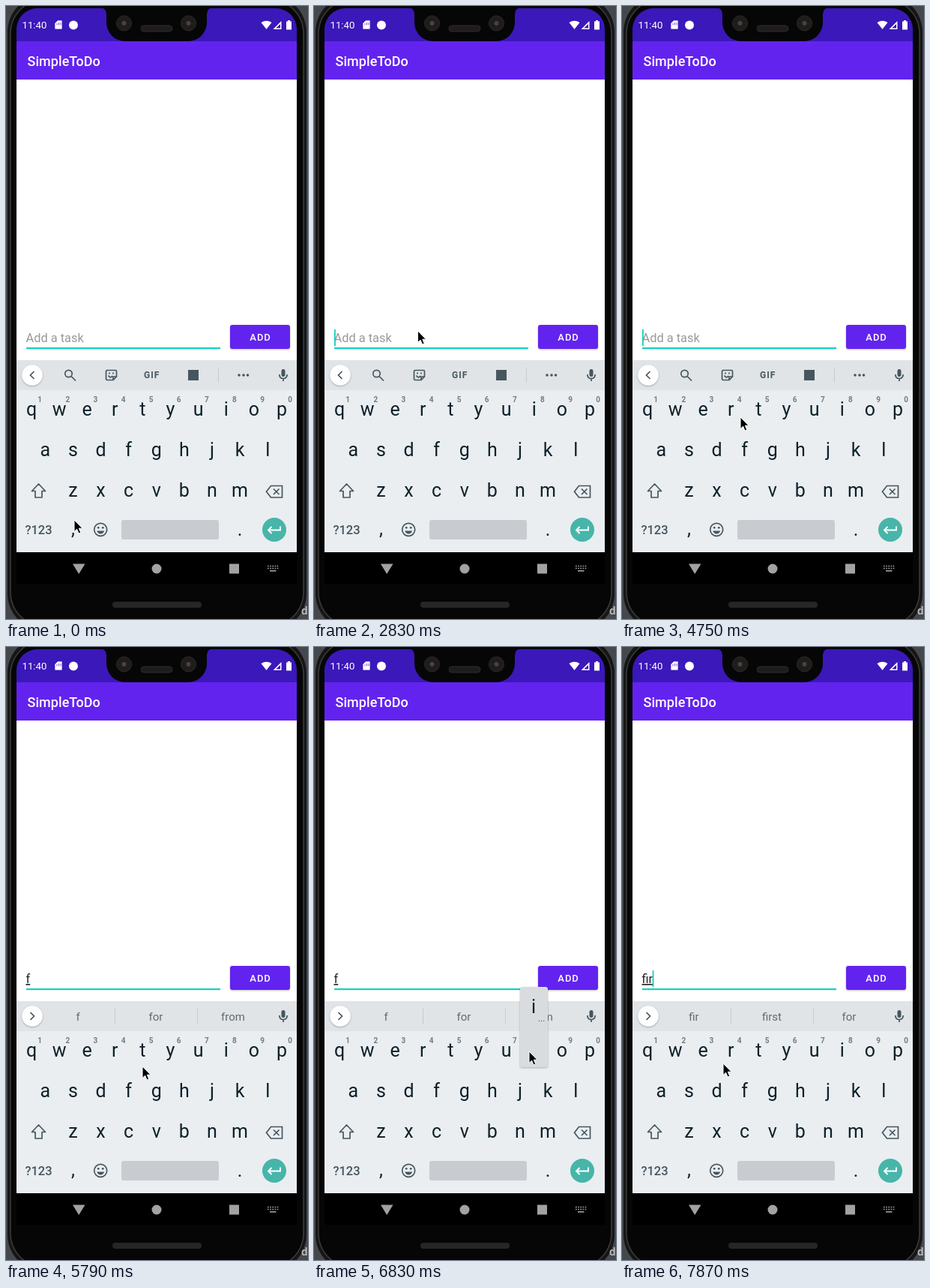
An HTML page for the animation above (8000 ms loop, 403 by 817 pixels).

```html
<!DOCTYPE html>
<html lang="en">
<head>
<meta charset="utf-8">
<title>Task list demo</title>
<style>
  html, body { margin: 0; width: 100%; height: 100%; overflow: hidden; background: #3b3e42; }
  svg { display: block; width: 403px; height: 817px; font-family: Roboto, sans-serif; }
  .mid { text-anchor: middle; }
  .key { font-size: 25px; fill: #0e2029; }
  .digit { font-size: 10px; font-weight: 700; fill: #757d82; }
  .hint { font-size: 15px; fill: #606b72; }
  .field { font-size: 16.4px; }
  .line { fill: none; stroke: #46565f; stroke-width: 1.7; }
  .solid { fill: #46565f; }
  .split { stroke: #c5cacd; }
  .soft { filter: drop-shadow(0 1px 1px #0004); }
</style>
</head>
<body>
<svg viewBox="0 0 403 817">
  <!-- phone body -->
  <rect width="403" height="817" fill="#45484c"/>
  <rect x="2" y="-15" width="399" height="848" rx="50" fill="#161616"/>
  <rect x="6" y="-9" width="391" height="836" rx="46" fill="#060606" stroke="#3c3c3c" stroke-width="1.5"/>
  <text x="394" y="811" font-size="15" font-weight="500" fill="#c4c4c4">d</text>
  <rect x="142" y="794" width="119" height="8" rx="4" fill="#262626"/>

  <!-- app -->
  <path d="M14 47V31A28 28 0 0 1 42 3H360A28 28 0 0 1 388 31V47Z" fill="#3b18b9"/>
  <path d="M126 2Q134 3 134 11V22A25 25 0 0 0 159 47H243A25 25 0 0 0 268 22V11Q268 3 276 2Z" fill="#060606"/>
  <g fill="#1f1c1c" stroke="#2e2a2a">
    <circle cx="157.500" cy="23" r="10"/><circle cx="243.500" cy="23" r="10"/>
    <rect x="180" y="26" width="42" height="8" rx="4"/>
  </g>
  <g fill="#4a4141"><circle cx="157.500" cy="23" r="3"/><circle cx="243.500" cy="23" r="3"/></g>
  <g fill="#fff">
    <text x="21.500" y="30" font-size="13.200">11:40</text>
    <path d="M69 19H74Q75 19 75 20V30Q75 31 74 31H66Q65 31 65 30V23ZM68 23V25.500M70.500 22V25.500M73 22V25.500" stroke="#3b18b9" stroke-width=".7"/>
    <circle cx="90" cy="25.500" r="6"/>
    <path d="M340.500 22Q347.500 17.500 354.500 22L347.500 31Z"/>
    <path d="M367.500 20V31H356.500ZM366 24L360.300 29.600H366Z" fill-rule="evenodd"/>
    <path d="M376 19H379V20.500H381V31.500H374V20.500H376Z"/>
  </g>
  <rect x="14" y="47" width="374" height="51" fill="#6323ef"/>
  <text x="28.500" y="80" font-size="18" font-weight="500" letter-spacing=".05" fill="#fff">SimpleToDo</text>
  <rect x="14" y="98" width="374" height="374" fill="#fff"/>
  <text id="prompt" class="field" x="26.500" y="448" fill="#999">Add a task</text>
  <text id="typed" class="field" x="26.500" y="448" fill="#222" text-decoration="underline"></text>
  <rect x="27" y="455" width="259" height="2.200" fill="#15cfc2"/>
  <rect id="caret" y="431" width="1.800" height="22" fill="#15cfc2"/>
  <rect class="soft" x="299" y="425" width="80" height="32" rx="3" fill="#6323ef"/>
  <text class="mid" x="339.500" y="446" font-size="13" font-weight="500" letter-spacing=".9" fill="#fff">ADD</text>

  <!-- keyboard -->
  <rect x="14" y="472" width="374" height="256" fill="#eaeef1"/>
  <rect x="14" y="472" width="374" height="40" fill="#e0e4e6"/>
  <circle class="soft" cx="35" cy="492" r="13.800" fill="#fff"/>
  <path id="chevron" class="line"/>
  <g id="tools">
    <g class="line">
      <circle cx="83.500" cy="490" r="4.700"/><path d="M87 493.500L93 499.500"/>
      <path d="M135 485.500H146Q147.500 485.500 147.500 487V494L143 498.500H135Q133.500 498.500 133.500 497V487Q133.500 485.500 135 485.500ZM147 494H143V498M136.500 492.500Q139.500 497 142 493"/>
    </g>
    <g class="solid">
      <circle cx="138" cy="489.500" r="1.100"/><circle cx="143" cy="489.500" r="1.100"/>
      <text class="mid" x="194.700" y="496" font-size="12" font-weight="700" letter-spacing="1">GIF</text>
      <rect x="243" y="485" width="14" height="14"/>
      <circle cx="311" cy="492" r="1.800"/><circle cx="317" cy="492" r="1.800"/><circle cx="322.500" cy="492" r="1.800"/>
    </g>
    <path class="split" d="M283.500 482V502"/>
  </g>
  <g id="hints">
    <path class="split" d="M145.500 482V502M255.500 482V502"/>
    <text class="hint mid" x="96" y="497.500"></text>
    <text class="hint mid" x="200" y="497.500"></text>
    <text class="hint mid" x="303" y="497.500"></text>
  </g>
  <rect class="solid" x="367.500" y="484" width="5" height="10" rx="2.500"/>
  <path class="line" d="M364.800 491Q365 496.500 370 496.500T375.200 491M370 496.500V500"/>
  <g id="keys"></g>
  <g class="line">
    <path d="M43.500 637L52.500 646.500H48V655H39V646.500H34.500Z" stroke-linejoin="round"/>
    <path d="M353.500 639.500H368.500V655H353.500L347.500 647.200ZM357 643.500L364.500 651M364.500 643.500L357 651"/>
    <circle cx="126.200" cy="697.800" r="8.500"/>
  </g>
  <path class="solid" d="M121.200 699.500H131.200Q129.700 703.500 126.200 703.500T121.200 699.500Z"/>
  <circle class="solid" cx="123.200" cy="695.300" r="1.400"/><circle class="solid" cx="129.200" cy="695.300" r="1.400"/>
  <text class="mid" x="43.500" y="704" font-size="16.500" font-weight="500" fill="#46565f">?123</text>
  <rect x="154" y="685" width="130" height="26" rx="2.500" fill="#c8ccd0"/>
  <circle cx="358" cy="698" r="16" fill="#47b5a9"/>
  <path d="M366 693.500V698.500H350.500M354.500 694L350 698.500L354.500 703" fill="none" stroke="#fff" stroke-width="1.900"/>

  <!-- navigation -->
  <rect x="14" y="728" width="374" height="42"/>
  <g fill="#a2a2a2">
    <path d="M89 743.500H105.500L97.200 757Z"/><circle cx="201" cy="750" r="6.500"/>
    <rect x="298" y="743.500" width="13" height="13"/>
    <path d="M349 746.500H363.500M349 749.500H363.500" stroke="#a2a2a2" stroke-width="1.700" stroke-dasharray="1.700 1.450"/>
    <rect x="352" y="752" width="8.500" height="1.600"/>
  </g>

  <g id="popup">
    <rect class="soft" x="275" y="453" width="37" height="107" rx="3" fill="#d9dcde"/>
    <text class="key mid" x="293" y="488">i</text>
    <text x="299" y="499" font-size="12" fill="#46565f">...</text>
  </g>
  <path id="pointer" d="M0 -1V14.500L3.600 11.200L6 17L8.700 15.900L6.300 10.200H11Z" fill="#000" stroke="#fff" stroke-width="1"/>
</svg>
<script>
const el = id => document.getElementById(id);
const show = (id, on) => el(id).style.display = on ? '' : 'none';

const label = (text, cls, x, y) => `<text class="${cls} mid" x="${x}" y="${y}">${text}</text>`;
const row = (text, cls, x, y) =>
  [...text].map((c, i) => label(c, cls, x + 37.1 * i, y)).join('');
el('keys').innerHTML = row('qwertyuiop', 'key', 34, 546) + row('1234567890', 'digit', 45.2, 528) +
  row('asdfghjkl', 'key', 52.4, 600) + row('zxcvbnm', 'key', 89.4, 654) +
  label(',', 'key', 89.5, 705) + label('.', 'key', 312, 706);

const LOOP = 8000, STEP = 148.5;

// Pointer: step, x, y
const path = [
  [0, 91, 686], [6, 201, 624], [14, 201, 624], [15, 214, 610], [16, 234, 570], [17, 230, 520],
  [18, 185, 462], [19, 138.5, 434], [20, 132, 425], [22, 132, 437], [25, 136, 462], [29, 136, 462],
  [30, 140, 476], [32, 158, 549], [33, 163, 566], [34, 165, 574], [38, 165, 574], [39, 182, 560],
  [44, 282, 541], [46, 287, 540], [47, 278, 541], [51, 150, 556], [53, 135, 556]
];
// Steps at which the caret turns on or off, starting hidden
const blinks = [3, 6, 10, 13, 17, 20, 23, 26, 30, 33, 35, 39, 42, 45, 47, 50, 52];
// Typing: step, text, suggestions
const entries = [
  [0, '', []],
  [35, 'f', ['f', 'for', 'from']],
  [47, 'fi', ['fi', 'first', 'for']],
  [52, 'fir', ['fir', 'first', 'for']]
];

function pointerAt(n) {
  const i = Math.max(1, path.findIndex(p => p[0] >= n));
  const [a, x, y] = path[i - 1], [b, u, v] = path[i];
  const k = (n - a) / (b - a);
  return [x + (u - x) * k, y + (v - y) * k];
}

function draw(now) {
  const n = Math.min(53, Math.floor((now % LOOP + 12) / STEP));
  const [, text, hints] = entries.filter(e => e[0] <= n).pop();
  const typed = el('typed');
  typed.textContent = text;
  show('prompt', !text);
  show('tools', !text);
  show('hints', text);
  el('hints').querySelectorAll('text').forEach((t, i) => t.textContent = hints[i] || '');
  el('chevron').setAttribute('d', text ? 'M32.500 487L37.500 492L32.500 497' : 'M37.500 487L32.500 492L37.500 497');
  el('caret').setAttribute('x', 27 + (text ? typed.getComputedTextLength() - 1 : 0));
  show('caret', blinks.filter(b => b <= n).length % 2);
  show('popup', n === 46);
  el('pointer').setAttribute('transform', `translate(${pointerAt(n)})`);
}

const start = performance.now();
function tick() {
  draw(performance.now() - start);
  requestAnimationFrame(tick);
}
tick();
</script>
</body>
</html>
```
